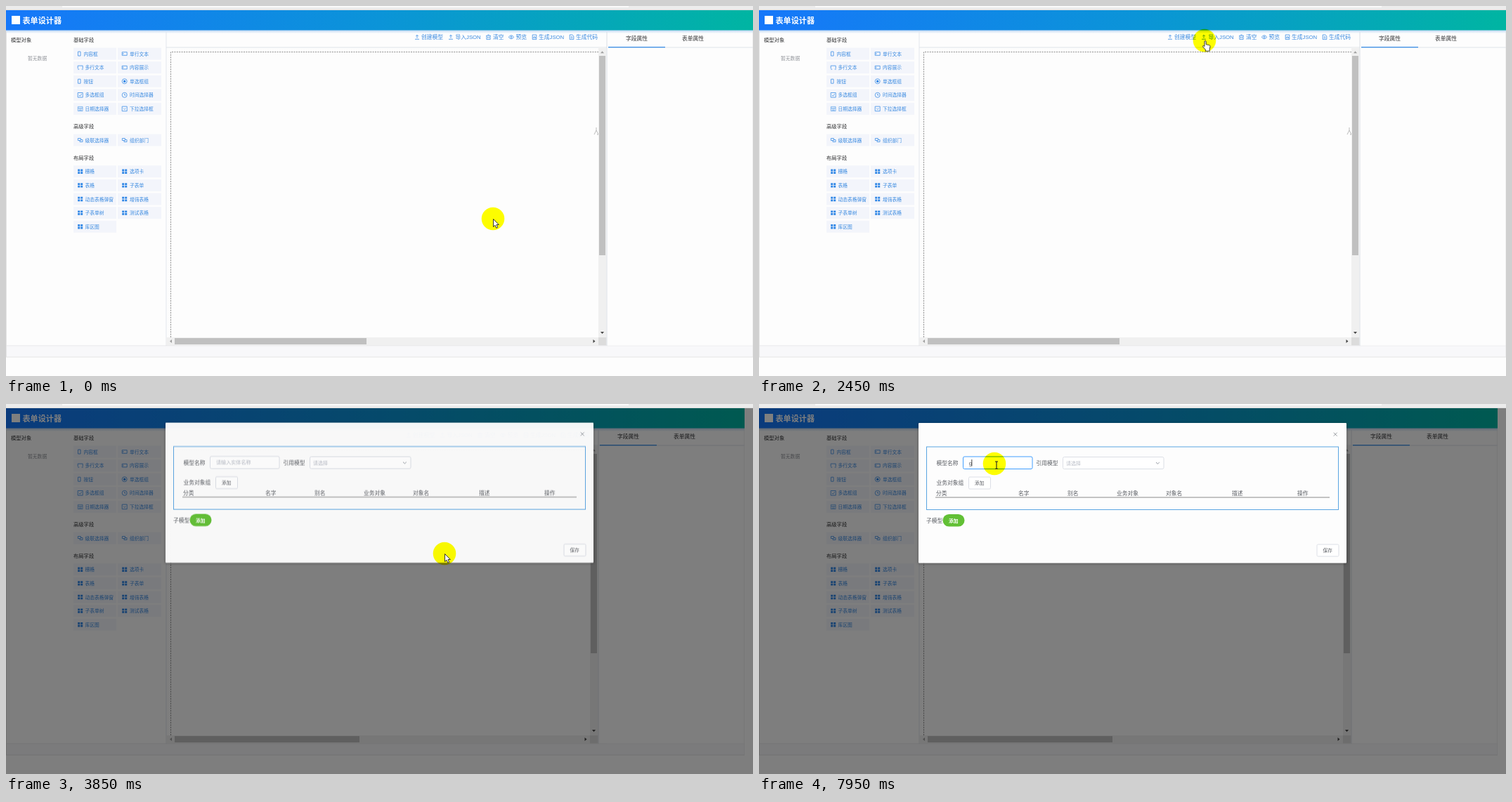
An HTML page for the animation above (8000 ms loop, 1063 px wide and 527 px high).

```html
<!DOCTYPE html>
<html>
<head>
<meta charset="utf-8">
<title>表单设计器</title>
<style>
html, body { margin: 0; width: 100%; height: 100%; overflow: hidden; background: #fdfdfd; }
svg { display: block; width: 1063px; height: 527px; }
text { font-family: "Liberation Sans", "Noto Sans CJK SC", "Noto Sans CJK", sans-serif; white-space: pre; }
.line { fill: none; stroke: #3d8fe6; stroke-width: .8; }
.solid { fill: #2f86e6; }
.timed { animation: 8s step-end infinite; }
.shift { animation: shift 8s step-end infinite; }
.thumb { animation: thumb 8s step-end infinite; }
.mask { animation: mask 8s linear infinite; }
.dialog { animation: dialog 8s linear infinite; }
.field { animation: focus 8s step-end infinite; }
.path { animation: path 8s linear infinite; }
.halo { mix-blend-mode: multiply; }
@keyframes shift { 0% { transform: none; } 45%, 100% { transform: translateX(-12px); } }
@keyframes thumb { 0% { width: 273px; } 45%, 100% { width: 263px; } }
@keyframes mask { 0%, 46.25% { opacity: 0; } 47.75%, 100% { opacity: .5; } }
@keyframes dialog {
  0%, 46.25% { opacity: 0; transform: translateY(-13px); animation-timing-function: ease; }
  48.75%, 100% { opacity: 1; transform: none; }
}
@keyframes focus { 0% { stroke: #dcdfe6; } 63%, 100% { stroke: #409eff; } }
</style>
</head>
<body>
<script>
const LOOP = 8000;
const css = [];
const pct = ms => +(ms / LOOP * 100).toFixed(4) + '%';

const rect = (x, y, w, h, fill, more = '') =>
  `<rect x="${x}" y="${y}" width="${w}" height="${h}" fill="${fill}" ${more}/>`;
const hline = (x, y, w, color) => rect(x, y, w, 1, color);
const vline = (x, y, h, color) => rect(x, y, 1, h, color);
const draw = (d, more = 'class="line"') => `<path d="${d}" ${more}/>`;
// y is the middle of the glyphs
const text = (x, y, s, size = 7.75, fill = '#5a5d63', more = '') =>
  `<text x="${x}" y="${y + size * .38}" font-size="${size}" fill="${fill}" ${more}>${s}</text>`;

// Content visible only within the given [from, to) spans
let timers = 0;
function during(spans, content) {
  const name = 'on' + timers++;
  let keys = spans[0][0] > 0 ? '0% { opacity: 0 }' : '';
  for (const [from, to] of spans) {
    keys += `${pct(from)} { opacity: 1 }`;
    if (to < LOOP) keys += `${pct(to)} { opacity: 0 }`;
  }
  css.push(`@keyframes ${name} { ${keys} 100% { opacity: ${spans.at(-1)[1] < LOOP ? 0 : 1} } }`);
  return `<g class="timed" style="animation-name:${name}">${content}</g>`;
}

// Icons, centred on 0,0
const icons = {
  page: draw('M-2-3h3.5v6h-3.5z'),
  box: draw('M-3.5-2.3h7v4.6h-7zM-2-1v2'),
  area: draw('M-3.5 1.5v-4h7v4M-3.5 2.5h2M2 2.5h2'),
  radio: '<circle r="3.5" class="line"/><circle r="1.7" class="solid"/>',
  check: draw('M-3.5-3.3h7v6.6h-7zM-1.8 0l1.4 1.5L2-1.5'),
  clock: '<circle r="3.5" class="line"/>' + draw('M0-2v2.2h1.8'),
  date: draw('M-3.3-3h6.6v6.2h-6.6zM-3.3-1h6.6M-2 .5h4M-2 2h4', 'class="line" opacity=".75"'),
  drop: draw('M-3.5-3.3h7v6.6h-7zM-1.6-.6L0 1 1.6-.6'),
  link: draw('M-3.3-2.5h4v3h-4zM-.7.5v2h4v-3h-2.6'),
  grid: draw('M-3.5-3.2h3v2.8h-3zM.5-3.2h3v2.8h-3zM-3.5.4h3v2.8h-3zM.5.4h3v2.8h-3z', 'class="solid"'),
  up: draw('M-3 3h6M0 1.5v-4.5M-1.8-1.2L0-3 1.8-1.2'),
  bin: draw('M-3.3-2h6.6M-1.2-3.3h2.4M-2.6-2v5.3h5.2V-2M-.9-.4v2M.9-.4v2'),
  eye: draw('M-3.8 0Q0-5 3.8 0Q0 5-3.8 0z') + '<circle r="1.1" class="line"/>',
  report: draw('M-2.8-3.3h5.6v6.6h-5.6zM-1.2-.5v2.3M.2-1.5v3.3M1.5 0v1.8'),
  doc: draw('M-2.8-3.3h3.8l1.8 1.8v4.8h-5.6zM-1.3-.5h2.6M-1.3 1.3h2.6'),
};
const icon = (name, x, y) => `<g transform="translate(${x} ${y})">${icons[name]}</g>`;

function fieldGroup(title, titleY, firstY, items) {
  return text(96, titleY, title, 7.3, '#303133') + items.map(([kind, label], i) => {
    const x = i % 2 ? 159 : 96, y = firstY + (i >> 1) * 19.6;
    const indent = kind == 'page' ? 14.5 : i % 2 ? 17 : 16.5;
    return rect(x, y - 8.5, i % 2 ? 62 : 61, 17, '#f3f5fb') +
      icon(kind, x + (kind == 'page' ? 8.5 : 9.7), y) + text(x + indent, y, label, 6.75, '#3a8ae0');
  }).join('');
}

const header = rect(0, 0, 1063, 6, '#ececec') + rect(80, 0, 806, 2, '#fafafa') +
  hline(0, 5, 1063, '#dcdcdc') + rect(0, 34, 1063, 5, 'url(#glow)') +
  rect(0, 6, 1063, 28.5, 'url(#bar)') + rect(8, 14, 12, 12, '#fff') +
  text(23.5, 20.5, '表单设计器', 11.1, '#fff', 'font-weight="bold"');

const sidebar = text(7, 48, '模型对象', 7.3, '#303133') + text(31, 74.5, '暂无数据', 6.8, '#909399') +
  fieldGroup('基础字段', 48, 68, [['page', '内容框'], ['box', '单行文本'], ['area', '多行文本'],
    ['box', '内容展示'], ['page', '按钮'], ['radio', '单选框组'], ['check', '多选框组'],
    ['clock', '时间选择器'], ['date', '日期选择器'], ['drop', '下拉选择框']]) +
  fieldGroup('高级字段', 171, 191, [['link', '级联选择器'], ['link', '组织部门']]) +
  fieldGroup('布局字段', 216, 235.8, [['grid', '栅格'], ['grid', '选项卡'], ['grid', '表格'],
    ['grid', '子表单'], ['grid', '动态表格弹窗'], ['grid', '增强表格'], ['grid', '子表单树'],
    ['grid', '测试表格'], ['grid', '库区图']]);

const board = vline(227.5, 37, 447, '#e4e7ed') + hline(228, 58.5, 627, '#dfe3ea') +
  draw('M234.5 472V65.5H850', 'fill="none" stroke="#8f8f8f" stroke-dasharray="2 1.4"') +
  rect(228, 472, 627, 11.5, '#f0f0f0') + rect(240, 473, 273, 9, '#c0c0c0', 'class="thumb"') +
  draw('M236 475v5l-3-2.5z', 'fill="#a0a0a0"') +
  hline(0, 483.5, 1063, '#e2e2e6') + rect(0, 484.5, 1063, 15.5, '#f8f8fa') +
  hline(0, 499.5, 1063, '#e6e6e6') + vline(0, 36, 464, '#e4e4e4');

const tools = [['up', 585, 591, '创建模型'], ['up', 633, 639.5, '导入JSON'], ['bin', 686.5, 693, '清空'],
  ['eye', 719, 725.5, '预览'], ['report', 752, 758, '生成JSON'], ['doc', 805, 811, '生成代码']]
  .map(([kind, ix, tx, label]) => icon(kind, ix, 44.3) + text(tx, 44.3, label, 7.75, '#3a8ae0')).join('');

const right = tools + rect(843, 59.5, 220, 424, '#fdfdfd') +
  rect(843, 59.5, 11.5, 412.5, '#f0f0f0') + rect(844, 71, 9, 284, '#c0c0c0') +
  rect(843, 472, 11.5, 11.5, '#dcdcdc') +
  draw('M846 67.2h5l-2.5-3z', 'fill="#a0a0a0"') + draw('M846 464h5l-2.5 3z', 'fill="#444"') +
  draw('M835.5 475v5l3-2.5z', 'fill="#444"') + vline(854.5, 37, 447, '#dcdfe6') +
  hline(857, 58.5, 206, '#dfe3ea') + rect(857, 58, 81, 1.3, '#3d8fe6') +
  text(882, 46.5, '字段属性', 7.75, '#303133') + text(962, 46.5, '表单属性', 7.75, '#303133') +
  vline(1062.5, 36, 464, '#e4e4e4');

const trace = draw('M840 173v4l-3 6M840 177l3 6h-2', 'fill="none" stroke="#aaa" stroke-width=".8"');

const button = (x, y, label) => rect(x + .5, y + .5, 31, 17, '#fff', 'rx="1.5" stroke="#dcdfe6"') +
  text(x + 9, y + 9, label, 6.7);
const columns = [[252, '分类'], [369, '名字'], [439, '别名'], [509, '业务对象'], [579, '对象名'],
  [673, '描述'], [766, '操作']].map(([x, label]) => text(x, 127.5, label)).join('');
const caret = x => rect(x, 79, .9, 9.5, '#333');

const dialog = rect(227, 27, 609, 199.5, '#fdfdfd', 'rx="1" filter="url(#shade)"') +
  draw('M817.7 40.7l5 5M822.7 40.7l-5 5', 'stroke="#909399" stroke-width=".9"') +
  rect(238.5, 61, 586, 89.5, 'none', 'stroke="#5aa5e2"') +
  text(252.5, 84, '模型名称') + rect(290.5, 75, 98.5, 17.5, '#fff', 'rx="2" stroke="#dcdfe6" class="field"') +
  during([[0, 6250], [7100, 7850]], text(299, 83.8, '请输入实体名称', 7.1, '#b8bcc6')) +
  during([[6250, 7050]], text(298.8, 83.8, 'c', 7.8)) + during([[7900, LOOP]], text(298.8, 83.8, 'g', 7.8)) +
  during([[4960, 5400], [5900, 6250], [7050, 7350]], caret(299.3)) +
  during([[6250, 6800], [7900, LOOP]], caret(302.4)) +
  text(394.5, 84, '引用模型') + rect(432.5, 75.5, 143.5, 17, '#fff', 'rx="2" stroke="#dcdfe6"') +
  text(437, 84, '请选择', 7, '#b8bcc6') +
  draw('M565 83l2.4 2.4L569.8 83', 'fill="none" stroke="#8a8f98" stroke-width=".9"') +
  text(252.5, 112.5, '业务对象组') + button(298, 103.5, '添加') + columns + hline(251, 132.5, 561, '#8a8a8a') +
  text(238, 166, '子模型') + rect(261.5, 157, 31, 17.5, '#62c035', 'rx="8.75"') +
  text(270, 166, '添加', 6.7, '#fff', 'font-weight="bold"') + button(793.5, 199.5, '保存');

// Pointer: [ms, x, y]
const stops = [[0, 693, 303], [450, 693, 303], [650, 430, 306], [800, 150, 290], [950, 110, 190],
  [1050, 104, 72], [1150, 132, 90], [1250, 108, 105], [1300, 100, 114], [1500, 240, 95],
  [1750, 600, 50], [1900, 770, 27], [1980, 822, 40], [2100, 785, 44], [2450, 635, 49],
  [2650, 426, 98], [2850, 606, 46], [2950, 606, 46], [3100, 768, 120], [3280, 690, 245],
  [3400, 624, 213], [4000, 624, 213], [4400, 806, 203], [4650, 690, 90], [4850, 480, 48],
  [5000, 284, 74], [5150, 335, 85], [LOOP, 335, 85]];
css.push(`@keyframes path { ${stops.map(([t, x, y]) =>
  `${pct(t)} { transform: translate(${x}px, ${y}px) }`).join(' ')} }`);

const ink = 'fill="#fff" stroke="#222" stroke-width=".9" stroke-linejoin="round"';
const pointer =
  during([[0, 760], [1400, 1720], [2530, 2800], [3000, 4960]],
    draw('M.5.5v11l2.5-2.3 1.7 4 2-.9-1.7-3.8h3.3z', ink)) +
  during([[760, 1400]], draw('M2.5-6l2.5 2.8H3.3V.2h3.4v-1.7L9.5 1 6.7 3.5V1.8H3.3v3.4H5L2.5 8 0 5.2h1.7V1.8h-3.4v1.7L-4.5 1l2.8-2.5V.2h3.4v-3.4H0z', ink)) +
  during([[1720, 2530], [2800, 3000]],
    draw('M0 1q1.3-1.5 2.2 0v4.5l4.6 1q1.4.4 1.2 2l-.8 4v2.5H1.4V13L-2.6 8.6q0-1.6 1.5-1.2L0 8.4z', ink)) +
  during([[4960, LOOP]], draw('M1-3h1.5l.5.6.5-.6H5M3-2.4v9M1 7.2h1.5l.5-.6.5.6H5', 'fill="none" stroke="#222" stroke-width="1.1"'));

const defs = `<defs>
  <linearGradient id="bar"><stop stop-color="#1677fa"/><stop offset=".5" stop-color="#0b94d8"/><stop offset="1" stop-color="#00b5a2"/></linearGradient>
  <linearGradient id="glow" x2="0" y2="1"><stop stop-color="#b9d4f2"/><stop offset="1" stop-color="#fdfdfd"/></linearGradient>
  <filter id="shade" x="-5%" y="-10%" width="110%" height="120%"><feDropShadow dx="0" dy="1" stdDeviation="2" flood-opacity=".3"/></filter>
</defs>`;

const scene = defs + rect(0, 0, 1063, 527, '#fdfdfd') + header + sidebar + board +
  during([[0, 3600]], trace) + `<g class="shift">${right}</g>` +
  during([[3600, LOOP]], rect(1051, 6, 12, 521, '#fdfdfd')) +
  rect(0, 6, 1063, 521, '#000', 'class="mask"') + `<g class="dialog">${dialog}</g>` +
  '<circle r="16.3" fill="#ff0" class="path halo"/>' + `<g class="path">${pointer}</g>`;

document.head.insertAdjacentHTML('beforeend', `<style>${css.join('\n')}</style>`);
document.body.insertAdjacentHTML('beforeend', `<svg viewBox="0 0 1063 527">${scene}</svg>`);
</script>
</body>
</html>
```
